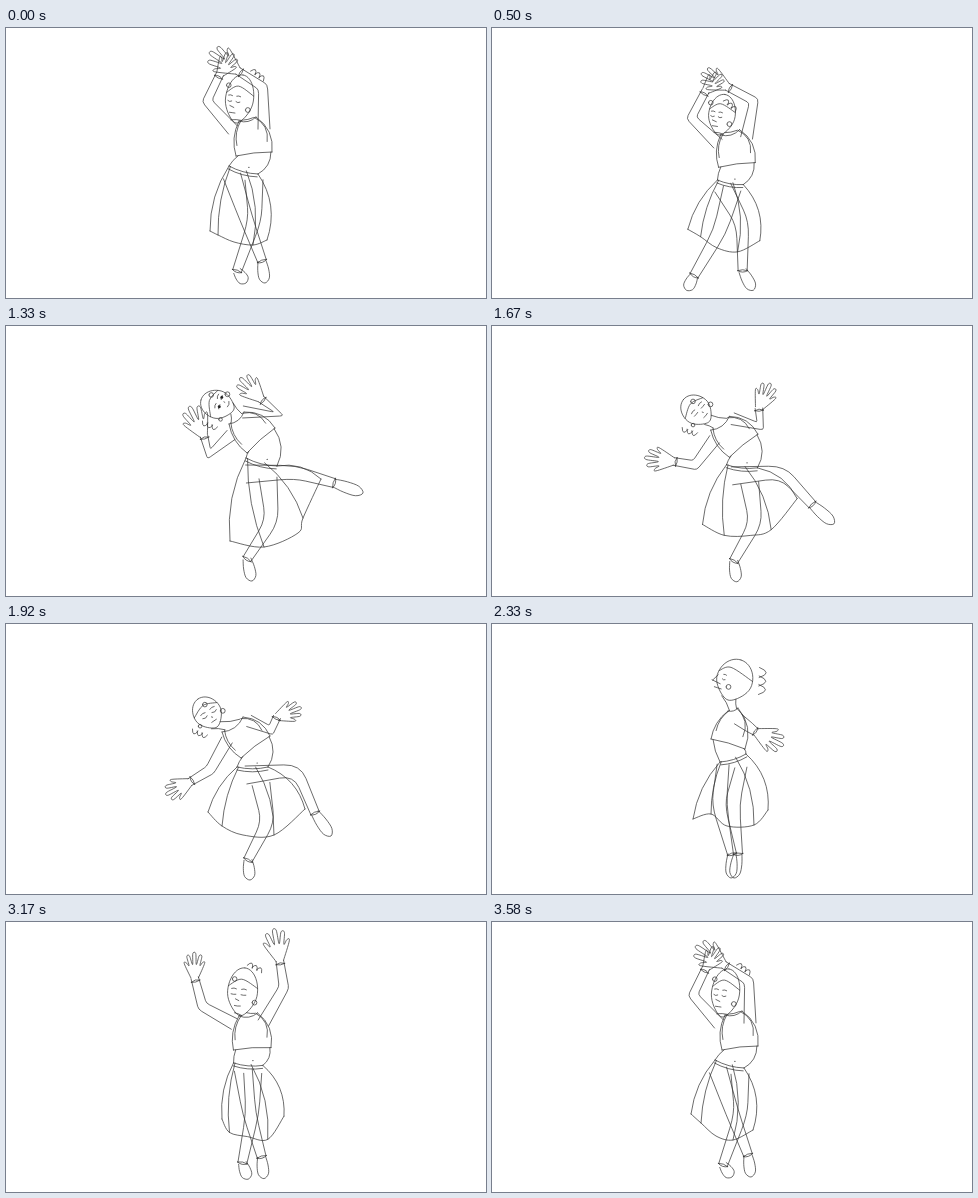
An HTML page that plays this animation: 480x270 px, repeating every 3680 ms.

```html
<!DOCTYPE html>
<html lang="en">
<head>
<meta charset="utf-8">
<title>Dancer</title>
<style>
html, body { margin: 0; width: 100%; height: 100%; overflow: hidden; background: #fff; }
svg { display: block; width: 100vw; height: 100vh; }
#ink { fill: none; stroke: #333; stroke-width: .72; stroke-linecap: round; stroke-linejoin: round; }
#dots { fill: #222; }
</style>
</head>
<body>
<svg viewBox="0 0 480 270"><path id="ink"/><path id="dots"/></svg>
<script>
const pts = text => text.split(' ').map(s => s.split(',').map(Number));

// A pose is a skeleton. Arms run shoulder, elbow, wrist, fingertip; legs hip, knee,
// ankle, toe; head chin, crown. Body holds the ends of the collar, hem and waist.
function pose(head, body, skirt, armA, armB, legA, legB, look) {
  return {
    head: pts(head), body: pts(body), skirt: pts(skirt), armA: pts(armA), armB: pts(armB),
    legA: pts(legA), legB: pts(legB), turn: 0, open: 0, wide: 14, bunSize: 3, hideA: 0,
    ...look, bun: pts(look.bun)
  };
}

const rest = pose('230,95 237,47', '233,93 250,89 230,128 266,124 223,138 252,146',
  '204,203 212,207 228,214 247,217 261,212',
  '227,102 201,73 214,46 227,27', '258,101 257,59 232,43 205,25',
  '248,152 249,192 231,243 240,255', '226,148 240,190 256,233 259,255',
  { turn: -.5, bun: '251,48' });
const crouch = pose('221,130 225,104', '220,134 243,126 220,161 258,155 230,179 250,177',
  '180,198 202,212 219,231 243,237 281,214',
  '224,142 197,122 214,95 231,87', '248,127 265,103 236,93 218,88',
  '225,177 184,212 149,240 139,223', '240,182 266,204 234,243 255,251',
  { turn: -.6, wide: 12, bun: '211,137' });
const kick = pose('228,83 195,74', '223,98 238,86 241,127 269,102 240,132 271,140',
  '224,215 258,221 292,207 297,192 315,153',
  '225,109 203,128 198,110 184,82', '237,86 273,88 255,73 235,53',
  '240,148 289,146 328,157 357,167', '262,152 266,195 241,233 246,255',
  { turn: .3, open: 1, bun: '204,98' });
const lean = pose('211,103 192,75', '216,108 237,93 235,134 264,112 231,143 262,143',
  '202,188 216,202 237,211 268,211 299,185',
  '221,116 204,146 184,158 161,170', '243,97 265,106 271,93 294,84',
  '240,151 291,146 309,189 325,212', '255,160 262,198 242,236 244,256',
  { turn: .1, bun: '194,108' });
const side = pose('236,76 249,36', '236,87 246,84 219,115 253,125 228,138 254,130',
  '201,195 219,190 235,202 262,201 276,186',
  '238,92 234,105 236,118 238,126', '246,95 257,103 264,108 290,121',
  '234,142 226,180 240,230 239,254', '246,142 241,180 246,230 242,254',
  { turn: -1, wide: 18, bun: '267,57', bunSize: 5, hideA: 1 });
const wide = pose('243,91 243,44', '233,96 255,95 222,128 263,129 237,147 267,138',
  '226,200 232,216 252,215 274,217 288,186',
  '231,102 200,108 172,113 146,106', '256,101 295,105 316,106 344,104',
  '244,150 241,190 245,233 239,254', '261,148 250,190 255,233 256,254',
  { open: 1, wide: 17, bun: '243,45' });
const settled = { ...rest, skirt: pts('199,192 209,201 224,214 241,218 261,208') };

const smooth = p => p * p * (3 - 2 * p);
const LOOP = 3680;
const keys = [
  { at: 0, pose: rest, ease: p => p ** 1.9 },
  { at: 880, pose: crouch, ease: p => p ** 1.8 },
  { at: 1330, pose: kick, ease: smooth },
  { at: 1920, pose: lean, ease: smooth },
  { at: 2330, pose: side, ease: smooth },
  { at: 2830, pose: wide, ease: smooth, settle: 500 },
  { at: 3580, pose: settled }
];

// The drawing changes only at these moments: first, last, count.
const steps = [0];
for (const [a, b, n] of [[83, 583, 7], [630, 1040, 6], [1167, 1667, 7], [1750, 2250, 7],
  [2333, 2830, 8], [2880, 3330, 8], [3420, 3580, 3]])
  for (let i = 0; i < n; i++) steps.push(Math.round((a + (b - a) * i / (n - 1)) / 10) * 10);

// ---- geometry
const mix = (a, b, p) => Array.isArray(a) ? a.map((v, i) => mix(v, b[i], p)) : a + (b - a) * p;
const add = (a, d, k = 1) => [a[0] + d[0] * k, a[1] + d[1] * k];
const sub = (a, b) => [a[0] - b[0], a[1] - b[1]];
const perp = d => [-d[1], d[0]];
const unit = d => { const l = Math.hypot(...d) || 1; return [d[0] / l, d[1] / l]; };
const polar = (a, r) => [Math.cos(a) * r, Math.sin(a) * r];
const angle = d => Math.atan2(d[1], d[0]);
const wrap = a => Math.atan2(Math.sin(a), Math.cos(a));

// Blend jointed chains by the bend at each joint, so that limbs swing in arcs.
function mixChain(a, b, p) {
  const out = [mix(a[0], b[0], p)];
  let was = 0, will = 0, now = 0;
  for (let i = 1; i < a.length; i++) {
    const u = sub(a[i], a[i - 1]), v = sub(b[i], b[i - 1]);
    const bendA = wrap(angle(u) - was), bendB = wrap(angle(v) - will);
    now += bendA + wrap(bendB - bendA) * p;
    was = angle(u);
    will = angle(v);
    out.push(add(out[i - 1], polar(now, mix(Math.hypot(...u), Math.hypot(...v), p))));
  }
  return out;
}

// ---- pen strokes
let ink = '', dots = '';
const xy = p => p[0].toFixed(2) + ' ' + p[1].toFixed(2) + ' ';
const line = list => { ink += 'M' + list.map(xy).join('L'); };
const control = (a, b, k) => add(mix(a, b, .5), perp(sub(b, a)), k);
const arc = (a, b, k) => { ink += 'M' + xy(a) + 'Q' + xy(control(a, b, k)) + xy(b); };
const ring = (c, r) => `M${xy(add(c, [-r, 0]))}a${r} ${r} 0 1 0 ${2 * r} 0a${r} ${r} 0 1 0 ${-2 * r} 0`;

function curve(p) {
  ink += 'M' + xy(p[0]);
  for (let i = 0; i < p.length - 1; i++) {
    const a = p[i - 1] || p[i], d = p[i + 2] || p[i + 1];
    ink += 'C' + xy(add(p[i], sub(p[i + 1], a), 1 / 6)) +
      xy(add(p[i + 1], sub(d, p[i]), -1 / 6)) + xy(p[i + 1]);
  }
}

// ---- body parts
function limb([a, b, c], widths, round) {
  const n0 = perp(unit(sub(b, a))), n2 = perp(unit(sub(c, b))), n1 = unit(add(n0, n2));
  for (const s of [-1, 1]) {
    const p = add(a, n0, s * widths[0]), q = add(b, n1, s * widths[1]), r = add(c, n2, s * widths[2]);
    ink += 'M' + xy(p) + 'L' + xy(mix(q, p, round)) + 'Q' + xy(q) + xy(mix(q, r, round)) + 'L' + xy(r);
  }
}

function cuff(from, at, w) {
  const n = perp(unit(sub(at, from))), a = add(at, n, w), b = add(at, n, -w);
  arc(a, b, .3);
  arc(a, b, -.2);
}

function hand(wrist, tip, w) {
  const d = sub(tip, wrist), len = Math.hypot(...d), dir = angle(d), n = perp(unit(d));
  const out = [add(wrist, n, -w)];
  for (let i = -2; i <= 2; i++) {
    const a = dir + i * .28, far = len * (1 - .07 * i * i);
    out.push(add(wrist, polar(a - .06, far)), add(wrist, polar(a + .06, far)));
    if (i < 2) out.push(add(wrist, polar(a + .14, len * .55)));
  }
  curve([...out, add(wrist, n, w)]);
}

function foot(ankle, toe) {
  const d = sub(toe, ankle), n = perp(unit(d));
  const edge = (t, w) => add(add(ankle, d, t), n, w);
  curve([edge(0, 4), edge(.4, 5.5), edge(.8, 5), edge(1, 0), edge(.8, -5), edge(.4, -5.5), edge(0, -4)]);
}

function arm(j) {
  limb(j, [6, 5, 3.8], .1);
  cuff(j[1], mix(j[2], j[1], .12), 4.5);
  hand(j[2], j[3], 3.8);
}

function leg(j) {
  limb(j, [9, 6.5, 4.5], .3);
  cuff(j[1], j[2], 5);
  foot(j[2], j[3]);
}

function head({ head: [chin, crown], turn, open, wide, bun: [bun], bunSize }) {
  const mid = mix(chin, crown, .5), down = sub(chin, mid), right = perp(unit(down)).map(v => -v * wide);
  const at = (u, v) => add(add(mid, right, u), down, v);
  const outline = [];
  for (let i = 0; i <= 48; i++) {
    const a = i / 24 * Math.PI, v = -Math.cos(a);
    outline.push(at(Math.sin(a) * (1 - .35 * Math.max(0, v) ** 2), v));
  }
  line(outline);
  curve([at(-.97, -.2), at(turn * .4, -.52), at(.97, -.2)]);

  const mid0 = turn * .75, gap = .42 * (1 - .6 * Math.abs(turn));
  for (const s of [-1, 1]) {
    if (s < 0 && turn < -.8) continue;
    const u = mid0 + s * gap, w = gap * .48;
    arc(at(u - w, .13), at(u + w, .13), .4 - .9 * open);
    arc(at(u - w, -.1), at(u + w, -.1), -.25);
    if (open > .5) dots += ring(at(u, .14), 1.4);
  }
  line([at(mid0 + turn * .4 - .04, .32), at(mid0 + .06, .38)]);
  if (turn < -.8) line([at(mid0 - .2, 0), at(mid0 + turn * .4, .32)]);
  arc(at(mid0 - .2, .6), at(mid0 + .2, .6), .3 * open);
  if (Math.abs(turn) < .55) ink += ring(at(turn * 1.8, -.5), 2.3);
  ink += ring(at(1 - 1.2 * turn * turn, .4), 2.4);
  if (turn > -.3) ink += ring(at(-.97, .4), 1.8);

  const out = unit(sub(bun, mid)), along = perp(out).map(v => -v);
  for (let i = -1; i <= 1; i++) {
    const c = add(bun, along, i * bunSize * 1.7);
    arc(add(c, along, -bunSize), add(c, along, bunSize), 1.4);
  }
  return at;
}

function body([neckA, neckB, hemA, hemB, waistA, waistB], at, turn) {
  arc(at(-.4, .9), mix(neckA, neckB, .15), -.1);
  arc(at(.4, .85), mix(neckA, neckB, .85), .1);
  arc(neckA, neckB, .3);
  arc(neckA, hemA, .2);
  arc(neckB, hemB, -.3);
  arc(mix(neckA, neckB, .12), mix(neckA, hemA, .7), .2);
  arc(mix(neckA, neckB, .9), mix(neckB, hemB, .7), -.36);
  arc(hemA, hemB, -.06);
  arc(mix(hemA, hemB, .06), waistA, .1);
  arc(mix(hemA, hemB, .97), waistB, -.3);
  const band = unit(perp(sub(waistB, waistA)));
  for (const k of [0, 3]) arc(add(waistA, band, k), add(waistB, band, k), .12);
  if (turn > -.8) dots += ring(add(mix(waistA, waistB, .65), band, -4), .6);
}

function skirt(hem, waistA, waistB) {
  arc(waistA, hem[0], .15);
  arc(waistB, hem[4], -.25);
  curve(hem);
  arc(mix(waistA, waistB, .05), hem[1], .1);
  arc(mix(waistA, waistB, .6), hem[3], -.15);
}

// ---- animation
const CHAINS = ['head', 'armA', 'armB', 'legA', 'legB'];

function draw(time) {
  let i = keys.length - 2;
  while (keys[i].at > time) i--;
  const a = keys[i], b = keys[i + 1], now = {};
  for (const name in a.pose) {
    const span = name !== 'skirt' && a.settle || b.at - a.at;
    const p = a.ease(Math.min(1, (time - a.at) / span));
    now[name] = (CHAINS.includes(name) ? mixChain : mix)(a.pose[name], b.pose[name], p);
  }
  ink = dots = '';
  body(now.body, head(now), now.turn);
  skirt(now.skirt, now.body[4], now.body[5]);
  leg(now.legA);
  leg(now.legB);
  if (now.hideA < .5) arm(now.armA);
  arm(now.armB);
  document.getElementById('ink').setAttribute('d', ink);
  document.getElementById('dots').setAttribute('d', dots);
}

let shown = -1;
function tick() {
  const clock = performance.now() % LOOP;
  const time = steps.filter(s => s <= clock).pop();
  if (time !== shown) draw(shown = time);
  requestAnimationFrame(tick);
}
tick();
</script>
</body>
</html>
```
